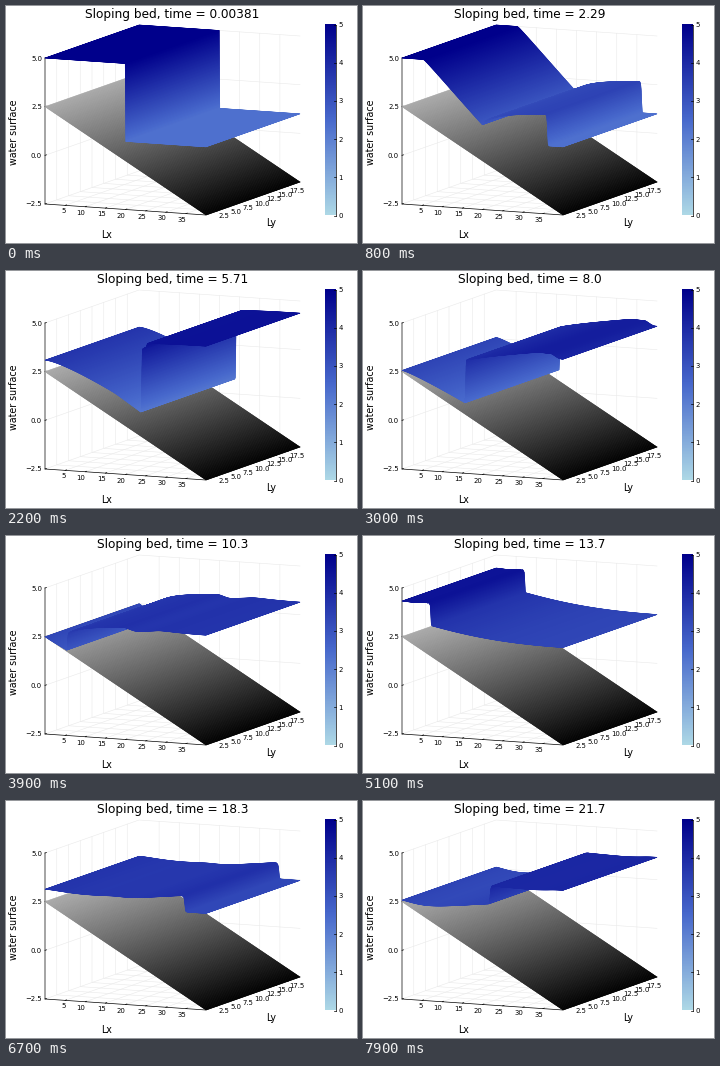
These frames come from a looping animation (351x237 px, 8000 ms). A matplotlib script:

```python
import numpy as np
import matplotlib.pyplot as plt
from matplotlib.animation import FuncAnimation
from matplotlib.collections import PolyCollection
from matplotlib.colors import LinearSegmentedColormap

W, H, DPI = 351, 237, 100
FRAMES, INTERVAL = 20, 400
LX, LY, Z0, Z1 = 40, 20, -2.5, 5.0

# Shallow water over a sloping bed, closed at both ends
G, N = 9.81, 300
DX = LX / N
STEPS = 300
DT = 8 / 7 / STEPS
faces = np.linspace(0, LX, N + 1)
bed_f = 2.5 - faces / 8
bed = (bed_f[1:] + bed_f[:-1]) / 2
xc = (faces[1:] + faces[:-1]) / 2


def slopes(q, theta=1.3):
    d = np.diff(q)
    a, b, c = theta * d[:-1], (d[:-1] + d[1:]) / 2, theta * d[1:]
    s = np.sign(a)
    m = np.minimum(np.minimum(abs(a), abs(b)), abs(c))
    return np.where(a * c > 0, s * m, 0)


def velocity(h, q):
    return np.where(h > 1e-3, q / np.maximum(h, 1e-3), 0)


def rate(w, q):
    """Central-upwind time derivative of level w and discharge q."""
    we = np.concatenate([w[1::-1], w, w[:-3:-1]])
    qe = np.concatenate([-q[1::-1], q, -q[:-3:-1]])
    dw, dq = slopes(we) / 2, slopes(qe) / 2
    wl, wr = we[1:-1] - dw, we[1:-1] + dw
    ql, qr = qe[1:-1] - dq, qe[1:-1] + dq
    # keep depths positive inside the domain
    low = wr[1:-1] < bed_f[1:]
    wr[1:-1] = np.where(low, bed_f[1:], wr[1:-1])
    wl[1:-1] = np.where(low, 2 * w - bed_f[1:], wl[1:-1])
    low = wl[1:-1] < bed_f[:-1]
    wl[1:-1] = np.where(low, bed_f[:-1], wl[1:-1])
    wr[1:-1] = np.where(low, 2 * w - bed_f[:-1], wr[1:-1])
    # mirror at the walls
    wr[0], wl[-1] = wl[1], wr[-2]
    qr[0], ql[-1] = -ql[1], -qr[-2]

    ha = np.maximum(wr[:-1] - bed_f, 0)
    hb = np.maximum(wl[1:] - bed_f, 0)
    ua, ub = velocity(ha, qr[:-1]), velocity(hb, ql[1:])
    qa, qb = ha * ua, hb * ub
    ca, cb = np.sqrt(G * ha), np.sqrt(G * hb)
    ap = np.maximum(np.maximum(ua + ca, ub + cb), 0)
    am = np.minimum(np.minimum(ua - ca, ub - cb), 0)
    span = np.maximum(ap - am, 1e-8)
    f1 = (ap * qa - am * qb + ap * am * (hb - ha)) / span
    fa = qa * ua + G * ha**2 / 2
    fb = qb * ub + G * hb**2 / 2
    f2 = (ap * fa - am * fb + ap * am * (qb - qa)) / span
    source = -G * (w - bed) * np.diff(bed_f) / DX
    return -np.diff(f1) / DX, -np.diff(f2) / DX + source


def step(w, q):
    a, b = rate(w, q)
    w1, q1 = np.maximum(w + DT * a, bed), q + DT * b
    a, b = rate(w1, q1)
    w2 = np.maximum((w + w1 + DT * a) / 2, bed)
    return w2, (q + q1 + DT * b) / 2


def simulate():
    w, q = np.where(xc < LX / 2, 5.0, 1.0), np.zeros(N)
    levels = [w]
    for _ in range(FRAMES - 1):
        for _ in range(STEPS):
            w, q = step(w, q)
        levels.append(w)
    return levels


levels = simulate()
times = [DT] + [k * STEPS * DT for k in range(1, FRAMES)]


# Parallel projection to stage pixels
def px(x, y, z):
    return (39 + 161 * x / LX + 94 * y / LY,
            198 + 11 * x / LX - 33 * y / LY - 146 * (z - Z0) / (Z1 - Z0))


def strips(x, z, n):
    """Bands along y, evenly spaced along the projected profile."""
    u, v = px(x, 0, z)
    s = np.concatenate([[0], np.cumsum(np.hypot(np.diff(u), np.diff(v)))])
    t = np.linspace(0, s[-1], n)
    x, z = np.interp(t, s, x), np.interp(t, s, z)
    front = np.column_stack(px(x, 0, z))
    back = np.column_stack(px(x, LY, z))
    quads = np.stack([front[:-1], front[1:], back[1:], back[:-1]], axis=1)
    return quads, ((z[1:] + z[:-1]) / 2 - Z0) / (Z1 - Z0)


blues = LinearSegmentedColormap.from_list(
    "water", ["lightblue", (0.28, 0.41, 0.80), "darkblue"])

plt.rcParams["font.family"] = "DejaVu Sans"
fig = plt.figure(figsize=(W / DPI, H / DPI), dpi=DPI, facecolor="white")
ax = fig.add_axes([0, 0, 1, 1])
ax.set_xlim(0, W)
ax.set_ylim(H, 0)
ax.axis("off")


def line(points, color="black", lw=0.5, z=1):
    u, v = zip(*points)
    ax.plot(u, v, color=color, lw=lw, zorder=z)


def label(x, y, s, size=6.94, **kw):
    kw = {"ha": "center", "va": "center_baseline", **kw}
    return ax.text(x, y, s, fontsize=size * 72 / DPI, zorder=6, **kw)


def grid(*corners):
    line([px(*c) for c in corners], "#e9e9e9", 0.4, 0)


for x in range(5, LX, 5):
    grid((x, 0, Z0), (x, LY, Z0), (x, LY, Z1))
    u, v = px(x, 0, Z0)
    line([(u, v), (u + 1.4, v - 0.5)])
    label(u + 0.3, v + 5.5, str(x), ha="right")
for y in np.arange(2.5, LY, 2.5):
    grid((LX, y, Z0), (0, y, Z0), (0, y, Z1))
    u, v = px(LX, y, Z0)
    line([(u, v), (u - 1.5, v - 0.1)])
    label(u + 1, v + 4.5, f"{y:.1f}", ha="left")
for z in (-2.5, 0.0, 2.5, 5.0):
    grid((0, 0, z), (0, LY, z), (LX, LY, z))
    u, v = px(0, 0, z)
    line([(u, v), (u + 1.5, v - 0.5)])
    label(36, v, f"{z:.1f}".replace("-", "\u2212"), ha="right")
line([px(0, 0, Z1), px(0, 0, Z0), px(LX, 0, Z0), px(LX, LY, Z0)])

label(101, 228, "Lx", 9.55)
label(265, 216, "Ly", 9.55)
label(8, 126, "water surface", 9.55, rotation=90, va="center")
title = label(166.5, 7, "", 12.15)

# Colour bar
ax.imshow(np.linspace(1, 0, 256)[:, None], cmap=blues, aspect="auto",
          extent=(319, 329.5, 209.5, 18.5), zorder=1)
line([(329.5, 18.5), (329.5, 209.5)], z=2)
for k in range(6):
    v = 209.5 - 38.2 * k
    line([(328, v), (329.5, v)], z=2)
    label(332.5, v, str(k), ha="left")
ax.set_xlim(0, W)
ax.set_ylim(H, 0)

quads, shade = strips(faces, bed_f, 200)
ax.add_collection(PolyCollection(quads, facecolors=plt.cm.gray(shade),
                                 edgecolors="face", linewidths=0.4, zorder=3))
water = PolyCollection([], linewidths=0.4, zorder=4)
ax.add_collection(water)


def draw(i):
    x = np.concatenate([[0], xc, [LX]])
    z = np.pad(levels[i], 1, mode="edge")
    quads, shade = strips(x, z, 500)
    colors = blues(shade)
    water.set_verts(quads)
    water.set_facecolor(colors)
    water.set_edgecolor(colors)
    title.set_text(f"Sloping bed, time = {float(f'{times[i]:.3g}')}")
    return water, title


anim = FuncAnimation(fig, draw, frames=FRAMES, interval=INTERVAL, repeat=True)
plt.show()
```
